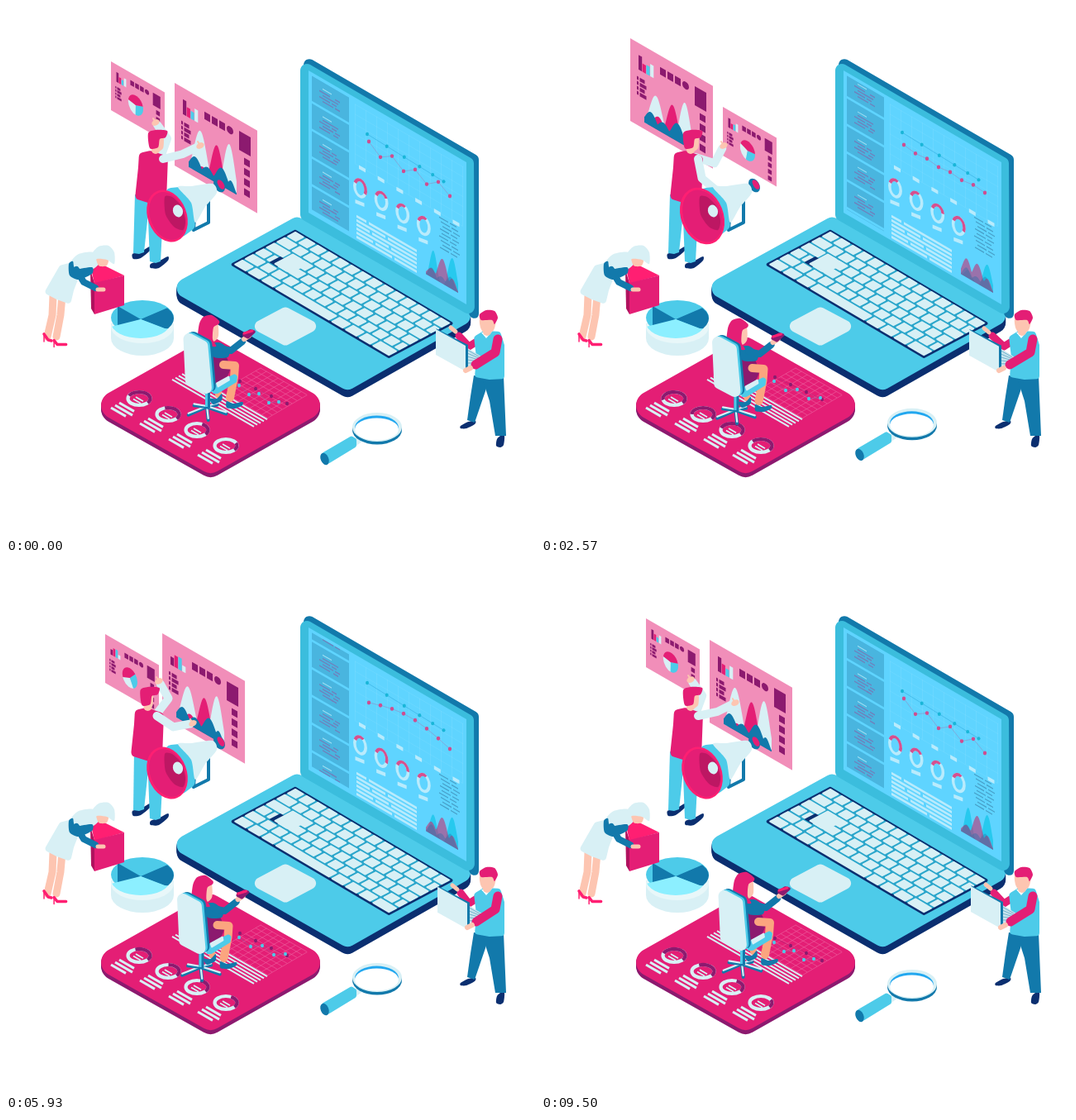
Write an HTML page with a canvas that moves like this. It is 640 by 640 pixels and loops after 9.57 s.

```html
<!DOCTYPE html>
<html lang="en">
<head>
<meta charset="utf-8">
<title>Isometric analytics team</title>
<style>
html, body { margin: 0; width: 100%; height: 100%; overflow: hidden; background: #fff; }
canvas { display: block; width: 100%; height: 100%; }
</style>
</head>
<body>
<canvas id="stage" width="640" height="640"></canvas>
<script>
const ctx = document.getElementById('stage').getContext('2d');
const LOOP = 9570, SLOPE = 0.577;
const PINK = '#e41e75', HOT = '#ff1f72', WINE = '#8c1a6f', PALE = '#d8f0f5',
  CYAN = '#4dcbe9', BLUE = '#1279ab', NAVY = '#0b2f70', SKIN = '#fdc5b1', TAN = '#fba57f';

// ---- Motion ----
// Smooth looping keyframes: [time, ...values], flat at extremes and holds.
function track(keys, period = LOOP) {
  const n = keys.length;
  const at = j => {
    const k = keys[(j + n) % n];
    return [k[0] + Math.floor(j / n) * period, ...k.slice(1)];
  };
  const slope = (p, q, r, j) =>
    (q[j] - p[j]) * (r[j] - q[j]) <= 0 ? 0 : (r[j] - p[j]) / (r[0] - p[0]);
  return time => {
    const t = time % period;
    let i = n - 1;
    while (keys[i][0] > t) i--;
    const [a, b, c, d] = [at(i - 1), at(i), at(i + 1), at(i + 2)];
    const h = c[0] - b[0], u = (t - b[0]) / h, s = u * u * (3 - 2 * u);
    return b.slice(1).map((v, k) => {
      const j = k + 1;
      return v + (c[j] - v) * s + h * slope(a, b, c, j) * u * (1 - u) ** 2
        - h * slope(b, c, d, j) * u * u * (1 - u);
    });
  };
}
const cycle = (t, count) => t / LOOP * Math.PI * 2 * count;

// Four resting poses, run through twice per loop.
const poseWeights = track([[0, 1, 0, 0, 0], [900, 0, 1, 0, 0], [1160, 0, 1, 0, 0], [2550, 0, 0, 1, 0],
  [2660, 0, 0, 1, 0], [4210, 0, 0, 0, 1], [4715, 1, 0, 0, 0]], LOOP / 2);
let weights;
const blend = (...v) => v.reduce((s, x, i) => s + x * weights[i], 0);

const bigPanel = track([[0, 204, 93], [150, 204, 93], [930, 150, 82], [2080, 108, 39], [5050, 108, 39],
  [5930, 189, 85], [6900, 204, 93]]);
const smallPanel = track([[0, 127, 67], [150, 127, 67], [930, 185, 101], [2080, 220, 122], [5050, 220, 122],
  [5930, 120, 86], [7100, 127, 67]]);
const farHand = track([[0, 181, 141], [930, 186, 144], [2570, 221, 169], [4210, 221, 161], [5930, 185, 143], [7430, 212, 163]]);
const nearHand = track([[0, 235, 169], [930, 220, 184], [2570, 213, 224], [4210, 238, 176], [5930, 226, 194], [7430, 212, 224]]);
const turnAway = track([[0, 0], [930, 1], [1900, 0], [5000, 0], [5930, 1], [6900, 0]]);
const rise = track([[0, 0], [750, 1], [1300, 1], [2200, 0]], LOOP / 3);
const pulse = track([[0, 0], [180, 0.9], [620, 1], [930, 0.5], [1130, 0]], LOOP / 8);

// ---- Drawing helpers ----
function outline(p, r = 0) {
  ctx.beginPath();
  const n = p.length;
  if (r) {
    ctx.moveTo((p[0] + p[n - 2]) / 2, (p[1] + p[n - 1]) / 2);
    for (let i = 0; i < n; i += 2) ctx.arcTo(p[i], p[i + 1], p[(i + 2) % n], p[(i + 3) % n], r);
  } else for (let i = 0; i < n; i += 2) ctx.lineTo(p[i], p[i + 1]);
  ctx.closePath();
}
function poly(color, p, r) { outline(p, r); ctx.fillStyle = color; ctx.fill(); }
function shifted(dx, dy, draw) {
  ctx.save();
  ctx.translate(dx, dy);
  draw();
  ctx.restore();
}
function slab(side, top, depth, p, r) {
  for (let d = depth; d > 0; d--) shifted(0, d, () => poly(side, p, r));
  poly(top, p, r);
}
const diamond = (x, y, rx, ry) => [x - rx, y, x, y - ry, x + rx, y, x, y + ry];

// Closed smooth curve through the points.
function blob(color, p) {
  const n = p.length, at = i => p[(i + n) % n];
  ctx.beginPath();
  ctx.moveTo(p[0], p[1]);
  for (let i = 0; i < n; i += 2) {
    const control = (j, sign) => at(j) + sign * (at(j + 2) - at(j - 2)) / 8;
    ctx.bezierCurveTo(control(i, 1), control(i + 1, 1), control(i + 2, -1), control(i + 3, -1), at(i + 2), at(i + 3));
  }
  ctx.fillStyle = color;
  ctx.fill();
}
function line(color, width, p, cap = 'round') {
  ctx.beginPath();
  for (let i = 0; i < p.length; i += 2) ctx.lineTo(p[i], p[i + 1]);
  Object.assign(ctx, { strokeStyle: color, lineWidth: width, lineCap: cap, lineJoin: 'round' });
  ctx.stroke();
}
function oval(color, x, y, rx, ry, turn = 0) {
  ctx.beginPath();
  ctx.ellipse(x, y, rx, ry, turn, 0, 7);
  ctx.fillStyle = color;
  ctx.fill();
}
function arc(color, width, x, y, rx, ry, from, to) {
  ctx.beginPath();
  ctx.ellipse(x, y, rx, ry, 0, from, to);
  Object.assign(ctx, { strokeStyle: color, lineWidth: width, lineCap: 'butt' });
  ctx.stroke();
}
function rect(color, x, y, w, h) { ctx.fillStyle = color; ctx.fillRect(x, y, w, h); }
function skewed(x, y, slope, draw) {
  ctx.save();
  ctx.transform(1, slope, 0, 1, x, y);
  draw();
  ctx.restore();
}
// Area chart of rounded humps: [centre, height, half width].
function area(color, x0, x1, base, humps) {
  const p = [x0, base];
  for (let x = x0; x <= x1; x++) {
    const heights = humps.map(([c, h, w]) =>
      Math.abs(x - c) < w ? h * (1 + Math.cos((x - c) / w * Math.PI)) / 2 : 0);
    p.push(x, base - Math.max(...heights));
  }
  poly(color, [...p, x1, base]);
}
function dots(color, link, r, count, place) {
  const p = Array.from({ length: count }, (_, i) => place(i)).flat();
  line(link, 0.6, p);
  for (let i = 0; i < p.length; i += 2) oval(color, p[i], p[i + 1], r, r * 1.1);
}

// ---- Wall panels and presenter ----
function panel(x, y, big, t) {
  const k = big ? 1 : 0.65, beat = Math.cos(cycle(t, 3));
  skewed(x, y, SLOPE, () => {
    rect('rgba(228,30,117,.5)', 0, 0, big ? 100 : 65, big ? 100 : 59);
    ctx.scale(k, k);
    [WINE, PINK, CYAN, PALE].forEach((c, i) => {
      const h = 14 - i + 4 * Math.cos(cycle(t, 4) + i * 2);
      rect(c, 10 + i * 4.7, 32 - h, 4.2, h);
    });
    for (let i = 0; i < 3; i++) rect(WINE, 36 + i * 9, 14, 7, 9);
    oval(WINE, 67, 18.5, 4, 4.5);
    rect(WINE, 78, 13, 14, 23);
    for (let i = 0; i < 4; i++) {
      rect(WINE, 84, 42 + i * 12.3, 7, 8);
      rect(WINE, 8, 41 + i * 6, 2, 4);
      rect(WINE, 11.5, 41 + i * 6, 6 + i % 2 * 2, 4.5);
    }
    if (big) {
      area(PALE, 17, 75, 92, [[31, 34 + 18 * beat, 16], [66, 50 + 6 * beat, 14]]);
      area(PINK, 17, 75, 92, [[34, 20 - 10 * beat, 14], [51, 38 + 8 * beat, 14], [66, 10, 11]]);
      area(BLUE, 17, 75, 92, [[25, 17, 14], [40, 13, 14], [57, 22, 15], [68, 13, 9]]);
    } else {
      const turn = blend(0, -0.5, 0.2, 1.3);
      [[PALE, 1.5, 3.5], [CYAN, -0.3, 1.6], [PINK, 3.3, 6]].forEach(([color, from, to]) => {
        ctx.beginPath();
        ctx.moveTo(46, 55);
        ctx.ellipse(46, 55, 14, 18, 0, from + turn, to + turn);
        ctx.fillStyle = color;
        ctx.fill();
      });
    }
  });
}

// Two-bone arm whose elbow is solved from the hand.
function arm(x, y, [hx, hy]) {
  const dx = hx - x, dy = hy - y, d = Math.hypot(dx, dy);
  const bend = Math.sqrt(Math.max(0, 24 ** 2 - d * d / 4)) / d;
  const ex = x + dx / 2 - dy * bend, ey = y + dy / 2 + dx * bend;
  line(PALE, 10, [x, y, ex, ey, hx + (ex - hx) * .15, hy + (ey - hy) * .15]);
  oval(SKIN, hx, hy, 5, 3.5, -0.5);
  line(SKIN, 2, [hx, hy, hx - 3, hy - 5]);
}

function presenter(t) {
  const p = turnAway(t)[0], dx = -5 * p;
  blob(NAVY, [153, 300, 163, 297, 174, 291, 174, 296, 163, 305, 154, 306]);
  blob(NAVY, [175, 312, 186, 308, 196, 303, 196, 308, 185, 317, 175, 317]);
  poly(CYAN, [156 - p, 228, 174, 232, 167, 298, 161, 300, 154, 299]);
  poly(CYAN, [171, 230, 191, 231, 187, 309, 181, 311, 174, 309, 172, 258]);
  arm(187 + dx, 183, farHand(t));
  shifted(dx, 0, () => {
    poly(PINK, [161, 178, 175, 175, 196, 182, 194, 236, 178, 240, 156, 233, 160, 195], 6);
    shifted(dx * .9, 0, () => {
      line(SKIN, 10, [181, 168, 181, 174]);
      blob(SKIN, [178, 156, 190 - p * 3, 156, 190 - p * 3, 172, 181, 177, 177, 169]);
      blob(PINK, [172, 154, 181, 150, 195, 151, 193, 159, 186, 161, 184, 171, 174, 172]);
    });
  });
  arm(190 + dx * 1.5, 185, nearHand(t));
}

function megaphone(t) {
  const grow = 1 + 0.1 * pulse(t)[0];
  line(BLUE, 4, [229, 242, 245, 233, 245, 262, 227, 271, 229, 242], 'butt');
  oval(BLUE, 258, 217, 6, 9, -0.55);
  oval(PINK, 260, 216, 3.5, 6.5, -0.55);
  line(BLUE, 8, [248, 221, 257, 218], 'butt');
  poly(CYAN, [190, 221, 210, 219, 226, 230, 229, 268, 208, 284], 8);
  blob(PALE, [208, 219, 224, 218, 250, 215, 255, 226, 241, 243, 229, 262, 224, 238]);
  oval(HOT, 195, 254, 23.5 * grow, 32.5 * grow, -0.37);
  oval(PINK, 195.5, 254, 21 * grow, 30 * grow, -0.37);
  blob('#bd1763', [192, 231, 201, 231, 212, 242, 217, 260, 214, 271, 203, 267, 193, 252]);
  oval(PALE, 208, 248, 6, 7.5, -0.3);
}

// ---- Pie and box carrier ----
function clipped(p, draw) {
  ctx.save();
  outline(p);
  ctx.clip();
  draw();
  ctx.restore();
}
function pieChart() {
  rect(PALE, 127, 384, 76, 18);
  oval(PALE, 165, 402, 38, 21);
  oval('#e8f7f9', 165, 388, 38, 20);
  oval(CYAN, 165, 377, 38, 21);
  clipped([163, 379, 205, 361, 206, 400, 196, 392], () => oval(BLUE, 165, 378, 38, 21));
  poly(BLUE, [135, 363, 163, 379, 135, 388]);
  clipped([163, 379, 192, 390, 203, 391, 203, 410, 127, 410, 127, 388], () => oval('#8cefff', 163, 383, 36, 19));
}

function boxCarrier(t) {
  const p = rise(t)[0];
  for (const x of [0, 11]) {
    line(SKIN, 9, [57 + x, 350, 56 + x * .9, 374, 50 + x, 400]);
    line(HOT, 3.5, [46 + x * 1.1, 397 + x * .7, 51 + x, 404 + x * .5, 55 + x * 1.6, 405 + x * .4]);
    line(HOT, 1.5, [46 + x * 1.1, 396 + x * .7, 46 + x * 1.1, 406 + x * .6]);
  }
  shifted(-3 * p, 0, () =>
    poly(PALE, [65, 314, 80, 310, 89, 326, 82, 344, 78, 361, 61, 355, 46, 347], 4));
  const lift = draw => shifted(-9.5 * p, -10 * p, draw);
  lift(() => {
    poly('#b0125f', [102, 319, 107, 335, 107, 373, 103, 366]);
    poly(HOT, [103, 318, 113, 311, 143, 326, 107, 336]);
    poly(PINK, [107, 335, 143, 326, 143, 362, 107, 373]);
  });
  ctx.save();
  ctx.translate(66, 325);
  ctx.rotate(-0.36 * p);
  ctx.translate(-66, -325);
  blob(PALE, [78, 310, 88, 300, 106, 298, 112, 312, 98, 322, 78, 322]);
  blob(BLUE, [76, 312, 81, 309, 84, 318, 104, 316, 104, 324, 88, 331, 77, 326]);
  blob(SKIN, [109, 301, 124, 302, 122, 314, 112, 314]);
  blob(PALE, [104, 300, 112, 291, 124, 290, 131, 298, 131, 312, 122, 307, 110, 306, 106, 312]);
  ctx.restore();
  lift(() => {
    line(BLUE, 8, [85 + 3 * p, 319 + 5 * p, 94, 334, 108, 341]);
    line(SKIN, 5, [111, 343, 118, 343]);
  });
}

// ---- Laptop ----
const keyPoint = (u, v) => [350 + 13.57 * u - 12.8 * v, 272 + 8 * u + 6.8 * v];
const tile = (color, u0, v0, u1, v1, r) =>
  poly(color, [...keyPoint(u0, v0), ...keyPoint(u1, v0), ...keyPoint(u1, v1), ...keyPoint(u0, v1)], r);

function keyboard() {
  tile(NAVY, -0.1, -0.1, 14.1, 6.1, 2);
  tile('#2aa6cb', 0.1, 0.05, 13.9, 5.85);
  for (let row = 0; row < 6; row++) {
    for (let u = 0, i = 0; u < 13.9; i++) {
      let w = row === 5 ? (i === 3 ? 5 : 1.22) : i ? 1 : 1 + row % 3 * .35;
      if (14 - u - w < .6) w = 14 - u;
      tile(PALE, u + .05, row + .05, u + w - .1, row + .9, 1);
      u += w;
    }
  }
  tile(NAVY, 1.4, 2.9, 2.1, 3.95);
  tile(PALE, 1.7, 2.05, 3.2, 3.87, 1);
}

function sidebar(t) {
  const k = t / LOOP, scroll = 33.5 * k * k * (3 - 2 * k);
  clipped([4, 4, 49, 4, 49, 166, 4, 166], () => {
    for (let i = 0; i < 6; i++) {
      const y = 4 + i * 33.5 - scroll;
      rect('#49b5df', 4, y, 45, 30.5);
      rect('#9edff3', 17, y + 8, 11, 1.2);
      for (let j = 0; j < 4; j++) {
        rect('#6d83be', 13 + (i + j) % 2 * 4, y + 12 + j * 3.6, 13, 1.6);
        rect('#6d83be', 32 - (i + j) % 3 * 2, y + 12 + j * 3.6, 6, 1.6);
      }
    }
  });
}

function screen(t) {
  const light = '#b9ebfc', faint = 'rgba(255,255,255,.12)', beat = Math.cos(cycle(t, 2) - .2);
  poly('#5fd4ff', [366, 78, 557, 189, 557, 361, 366, 250]);
  skewed(366, 78, 0.58, () => {
    sidebar(t);
    for (let i = 0; i < 11; i++) rect(faint, 56 + i * 13, 8, .6, 72);
    for (let i = 0; i < 7; i++) rect(faint, 56, 8 + i * 12, 131, .6);
    for (let i = 0; i < 6; i++) {
      const gap = 12 + i * 23 % 42;
      rect(light, 61 + i * 22.7, 79, 8, 4.5);
      rect(light, 58, 141 + i * 5, gap, 3);
      rect(light, 61 + gap, 141 + i * 5, 70 - gap, 3);
    }
    for (let i = 0; i < 9; i++) {
      const x = 158 + i * 7 % 5;
      rect('#469dc5', x, 85 + i * 4.5, 11, 1.3);
      rect('#469dc5', x + 13, 85 + i * 4.5, 8, 1.3);
    }
    area('#27c9ee', 142, 181, 164, [[151, 22 + 12 * beat, 9], [174, 34 + 4 * beat, 11]]);
    area('rgba(190,55,120,.62)', 142, 181, 164, [[149, 17 - 6 * beat, 11], [162, 27 + 3 * beat, 12], [174, 13, 9]]);
    area('rgba(30,110,165,.35)', 142, 181, 164, [[149, 12, 9], [161, 8, 10], [172, 14, 10]]);
  });
  for (let i = 0; i < 4; i++) {
    const sweep = 1.6 + 1.6 * Math.max(0, Math.cos(cycle(t, 2) - i * 1.2));
    skewed(428.5 + i * 25.6, 220.5 + i * 15.2, .4, () => {
      arc(light, 3.5, 0, 0, 6.7, 10, 0, 7);
      arc('#d6508f', 3.5, 0, 0, 6.7, 10, -2.7, -2.7 + sweep);
      rect(light, -6, 16, 11, 4.5);
    });
  }
  const drift = blend(2, -8, 0, 5), bow = blend(2, -11, 1, 2), zigzag = blend(5, 0, 1, 3);
  dots('#19b6d8', '#34aee0', 2, 6, i => {
    const x = 437 + 25 * i - 1.3 * i * i;
    return [x, 153 + (x - 437) * .62 + drift];
  });
  dots('#cf4d90', '#8d91c6', 2.2, 8, i => [439 + 14 * i, 169 + 8 * i + bow * Math.sin(i * Math.PI / 7)
    - zigzag * Math.cos(i * Math.PI)]);
}

function laptop(t) {
  slab(NAVY, CYAN, 9, [194, 341, 352, 254, 575, 374, 413, 466], 12);
  poly(BLUE, [360, 59, 572, 182, 572, 376, 560, 383, 560, 190, 360, 75], 7);
  poly('#3bbddd', [356, 64, 566, 186, 567, 378, 356, 257], 8);
  screen(t);
  keyboard();
  poly(PALE, diamond(338, 387.5, 45, 24), 7);
}

// ---- Tablet and seated woman ----
const stripe = (color, w, x, y, len) => line(color, w, [x, y, x + len, y + len * SLOPE], 'butt');

function tablet(t) {
  slab(WINE, PINK, 5, diamond(247.5, 483, 150, 84.5), 17);
  for (let i = 0; i < 5; i++) stripe(PALE, 2, 217 - i * 4, 443 + i * 2.2, 99);
  for (let i = 0; i < 9; i++) {
    stripe('#ed65a1', .6, 308 - i * 6, 438 + i * 3.5, 56);
    line('#ed65a1', .6, [308 + i * 7, 438 + i * 4.1, 260 + i * 7, 466 + i * 4.1]);
  }
  for (let i = 0; i < 4; i++) {
    const x = 161 + i * 35, y = 475 + i * 19;
    const sweep = 3.6 - .5 * i + Math.cos(cycle(t, 2) - 4.5 + i * .37);
    arc(PALE, 4.2, x, y, 13.5, 8, 0, 7);
    arc(WINE, 4.2, x, y, 13.5, 8, .7 - sweep, .7);
    for (let j = 0; j < 2; j++) stripe(PALE, 1.8, x - 4 - j * 3, y - 2 + j * 2.5, 9);
    for (let j = 0; j < 3; j++) stripe(PALE, 3, x - 24 - j * 5, y + 5 + j * 3, j === 1 ? 21 : 18);
  }
  const sway = blend(3, -3, -2, 0), spread = blend(-2, 0, 0, 0);
  dots(WINE, '#b31f73', 2, 4, i => [283 + i * 19, 451 + i * 9 + sway]);
  dots(CYAN, '#9a5d9d', 2, 5, i => [282 + i * (14 + spread), 459 + i * 5 + sway - 3 * Math.cos(i * Math.PI)]);
}

function chairWoman() {
  const move = weights[1] + weights[2];
  shifted(-7.5 * move, 4 * move, () => {
    for (let i = 0; i < 5; i++) {
      const a = i * Math.PI * .4 + 1.5, x = 243 + 24 * Math.cos(a), y = 490 + 10 * Math.sin(a);
      line(BLUE, 4, [243, 485, x, y + 1]);
      line(PALE, 2.2, [243, 484, x, y - 1]);
    }
    line(BLUE, 6, [244, 468, 244, 486], 'butt');
    line(CYAN, 3, [242.5, 468, 242.5, 485], 'butt');
    line(TAN, 8, [255, 452, 257, 470]);
    blob(BLUE, [246, 475, 255, 475, 261, 469, 261, 477, 251, 482]);
    blob(WINE, [251, 421, 265, 422, 271, 440, 262, 456, 253, 456]);
    line(TAN, 10, [263, 434, 277, 435, 276, 449, 271, 474]);
    blob(BLUE, [267, 478, 275, 481, 286, 479, 286, 483, 277, 487, 267, 486]);
    blob(BLUE, [243, 411, 258, 407, 270, 416, 268, 425, 252, 425]);
    line(BLUE, 8, [259, 414, 272, 417, 286, 406]);
    line(SKIN, 6, [288, 403, 294, 399]);
    poly(WINE, [284, 398, 295, 391, 304, 393, 293, 403], 2);
    line(HOT, 3, [288, 396, 298, 393]);
    blob(SKIN, [246, 384, 256, 384, 257, 399, 253, 405, 246, 406]);
    blob(PINK, [234, 384, 239, 376, 249, 374, 258, 381, 257, 385, 251, 389, 250, 403, 254, 412, 234, 409, 232, 399]);
    poly(CYAN, [254, 456, 277, 445, 280, 448, 279, 455, 256, 469, 249, 469], 2);
    poly(PALE, [254, 456, 270, 447, 271, 453, 256, 462], 1);
    [BLUE, CYAN, PALE].forEach((color, i) =>
      shifted(5 - 2.5 * i, i - 2, () => poly(color, [214, 391, 244, 407, 250, 474, 217, 457], 7)));
  });
}

// ---- Magnifier and laptop holder ----
function magnifier(t) {
  shifted(0, -4.6 * (1 - Math.cos(cycle(t, 1))), () => {
    line(PALE, 8, [421, 529, 431, 522]);
    oval(BLUE, 449, 513, 30, 17.5);
    oval(PALE, 449, 509.5, 30, 17.5);
    oval('#22a7ef', 448.5, 510, 26.5, 14.5);
    oval('#fff', 448.5, 512, 26.5, 13.5);
    poly(CYAN, [382, 541, 418, 520, 424, 524, 424, 533, 388, 555], 3);
    oval(BLUE, 385.5, 548, 4.8, 7.5, -0.4);
  });
}

function laptopHolder() {
  const dx = blend(0, 2, -2, 0);
  blob(NAVY, [550, 508, 559, 503, 568, 502, 567, 506, 557, 511, 550, 511]);
  blob(NAVY, [594, 524, 598, 520, 603, 520, 602, 531, 598, 534, 593, 532]);
  poly(BLUE, [566, 447, 584, 449, 580, 466, 567, 504, 558, 501, 562, 472]);
  poly(BLUE, [575, 447, 602, 447, 605, 520, 592, 520, 585, 478]);
  line(PINK, 9, [574, 403, 560, 412, 548 + dx, 399]);
  poly(CYAN, [566, 400, 578, 393, 598, 394, 603, 410, 603, 451, 585, 452, 567, 449, 569, 425], 4);
  poly('#fff', [575, 395, 588, 394, 581, 402]);
  shifted(dx, Math.abs(dx) * .4, () => {
    poly('#c9e4ee', [557, 413, 575, 424, 568, 435, 557, 438]);
    for (let i = 0; i < 5; i++) line('#4b9fbd', .7, [558, 416 + i * 4, 572, 424 + i * 2]);
    poly(BLUE, [520, 390, 559, 410, 559, 442, 556, 442]);
    poly(PALE, [520, 391, 556, 411, 556, 442, 520, 422]);
    line(SKIN, 5, [538, 389, 544, 394]);
  });
  line(PINK, 11, [595, 403, 592, 419, 568 + dx * .5, 434]);
  line(SKIN, 6, [562 + dx, 438, 556 + dx, 441]);
  line(SKIN, 10, [582, 386, 582, 394]);
  blob(SKIN, [574, 376, 592, 377, 590, 392, 580, 397, 574, 389]);
  blob(PINK, [573, 373, 581, 368, 591, 369, 595, 377, 591, 385, 588, 380, 575, 380]);
}

function draw(now) {
  const t = now % LOOP;
  weights = poseWeights(t);
  ctx.clearRect(0, 0, 640, 640);
  laptop(t);
  panel(...bigPanel(t), true, t);
  panel(...smallPanel(t), false, t);
  presenter(t);
  megaphone(t);
  pieChart();
  boxCarrier(t);
  tablet(t);
  chairWoman();
  magnifier(t);
  laptopHolder();
}
const start = performance.now();
function tick() {
  draw(performance.now() - start);
  requestAnimationFrame(tick);
}
tick();
</script>
</body>
</html>
```
